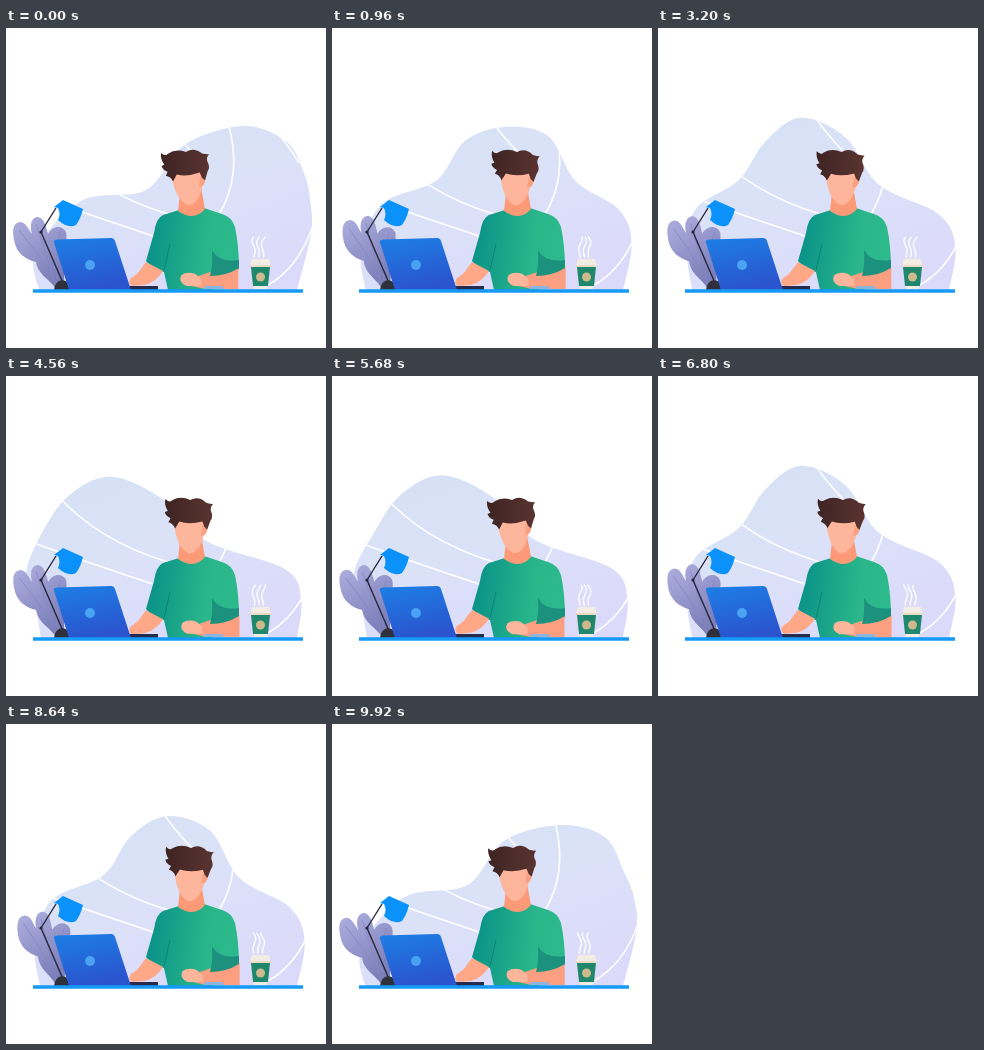
An HTML page that plays this animation: 320 by 320 pixels, repeating every 10 s.

```html
<!DOCTYPE html>
<html lang="en">
<head>
<meta charset="utf-8">
<title>Working at a desk</title>
<style>
  html, body { margin: 0; height: 100%; overflow: hidden; background: #fff; }
  svg { display: block; width: 100vw; height: 100vh; }
</style>
</head>
<body>
<svg viewBox="0 0 320 320">
  <defs>
    <linearGradient id="sky" x1="0" y1="0" x2=".6" y2="1">
      <stop stop-color="#d5e1f4"/><stop offset=".5" stop-color="#dbe2f8"/><stop offset="1" stop-color="#dcdafa"/>
    </linearGradient>
    <linearGradient id="leaf" x1="0" y1="0" x2=".5" y2="1">
      <stop stop-color="#b0b0e0"/><stop offset="1" stop-color="#7b7eb8"/>
    </linearGradient>
    <linearGradient id="shirt" x1="0" y1="0" x2="1" y2=".1">
      <stop offset=".1" stop-color="#0b9488"/><stop offset=".7" stop-color="#2ab68a"/><stop offset="1" stop-color="#2cb98b"/>
    </linearGradient>
    <linearGradient id="hair">
      <stop stop-color="#3e2423"/><stop offset="1" stop-color="#5a3430"/>
    </linearGradient>
    <linearGradient id="lid" x1="0" y1="0" x2=".3" y2="1">
      <stop stop-color="#1d7fe6"/><stop offset="1" stop-color="#2a55cf"/>
    </linearGradient>
    <clipPath id="inside"><path id="edge"/></clipPath>
    <clipPath id="above"><path d="M0 0H320V262H0Z"/></clipPath>
  </defs>

  <g clip-path="url(#above)">
    <path id="blob" fill="url(#sky)"/>
    <g clip-path="url(#inside)" fill="none" stroke="#fff" stroke-width="1.6">
      <path d="M50 118Q92 165 162 186M14 162Q80 186 150 209M152 82Q172 112 200 138"/>
      <path d="M221 92Q238 146 212 188M270 104Q282 116 293 135M306 200Q292 240 262 257"/>
    </g>
  </g>

  <g id="plant">
    <path fill="url(#leaf)" d="M50 261C44 251 32 247 30 234C20 232 10 225 8 212C6 202 7 195 14 194C20 194 22 201 26 206C23 196 26 189 32 189C38 190 40 198 42 206C46 198 56 196 60 204C62 215 57 225 58 236V261Z"/>
    <path fill="none" stroke="#8589c2" stroke-width=".8" d="M50 260Q40 224 30 196M43 243Q28 220 13 202M51 252Q49 220 54 204"/>
  </g>

  <path d="M57 255L35 204L50 180" fill="none" stroke="#25263a" stroke-width="1.4" stroke-linejoin="round"/>
  <circle cx="35" cy="204" r="1.6" fill="#25263a"/>
  <path d="M48 179L57 172L77 181Q75 190 70 197Q62 201 52 192Q55 186 52 180Z" fill="#0a92fa"/>
  <path d="M48 262Q49 253 56 252Q64 253 65 262Z" fill="#30303c"/>

  <g id="steam" fill="none" stroke="#fff" stroke-width="1.3" stroke-linecap="round"><path/><path/><path/></g>
  <path d="M246 231H263L265 238H264L261 261H248L245 238H244Z" fill="#f3ece2"/>
  <path d="M245 239H264L262 258H247Z" fill="#20876c"/>
  <path d="M244 238H265" stroke="#e3cbaa"/>
  <circle cx="254.500" cy="249" r="4.500" fill="#cdb98c"/>

  <path d="M173 182L157 187Q150 190 148 205L140 233Q148 243 158 244L162 262H206L233 241Q233 218 229 199Q226 189 216 186L198 180Z" fill="url(#shirt)"/>
  <path d="M158 242L164 216" fill="none" stroke="#0a8178" stroke-width=".9"/>
  <path d="M174 165L195 159L199 181Q188 194 172 183Z" fill="#fc9a78"/>
  <g id="head">
    <path d="M166 140L197 139Q200 158 193 170Q188 178 182 177Q171 173 167 150Z" fill="#fdb59b"/>
    <path d="M195 149Q201 147 200 154Q198 160 194 159Z" fill="#fba083"/>
    <path d="M157 124Q161 128 164 125Q172 120 182 124Q190 119 198 126Q202 127 205 127Q202 130 203 134Q206 140 203 144L200 153L197 150L195 145Q182 149 172 146L168 153Q166 148 161 147L163 143Q158 141 157 137L160 136Q156 130 157 124Z" fill="url(#hair)"/>
  </g>
  <path id="leftHand" d="M140 234L157 243Q150 254 139 257L126 258Q121 255 125 250Q132 246 134 242Z" fill="#fea888"/>
  <g id="rightHand">
    <path d="M190 249L205 244L233 239V261H200L186 258Z" fill="#fb9f80"/>
    <path d="M176 247Q182 243 190 246L196 251V258H181Q172 254 176 247Z" fill="#fdb59b"/>
  </g>
  <path d="M204 248Q207 238 206 222Q213 235 233 232V240Q220 248 204 248Z" fill="#1c917d"/>
  <path d="M199 258H216L218 261H197Z" fill="#8db4dc"/>

  <path d="M122 258H152V262H122Z" fill="#282b50"/>
  <path d="M51 211.500L105 210Q108 210 109 213L125 262H63L48 214.500Q47 212 51 211.500Z" fill="url(#lid)"/>
  <circle cx="84" cy="237" r="5" fill="#4aa3f2"/>
  <path d="M27 261.300H297V264.700H27Z" fill="#169af7"/>
</svg>

<script>
const LOOP = 10000, HALF = LOOP / 2, STEP = 80;
const el = id => document.getElementById(id);
const mix = (a, b, u) => a + (b - a) * u;
const smooth = u => u * u * (3 - 2 * u);

// Three poses of the backdrop: crest at the right, in the middle, at the left
const CREST = 3;
const poses = [
  [[75,173], [140,162], [178,117], [237,98], [281,114], [299,148], [304,172], [305,205]],
  [[42,177], [93,150], [119,112], [153,87], [196,106], [227,155], [282,185], [298,220]],
  [[18,200], [29,161], [57,121], [100,102], [152,124], [198,166], [279,194], [295,226]]
];

// The crest rushes to the middle, lingers, then glides left; the way back mirrors it
function outline(m) {
  const q = m / HALF * 2, toLeft = q > 1;
  const u = toLeft ? smooth(q - 1) : 1 - (1 - q) ** 3;
  const from = poses[+toLeft], to = poses[1 + toLeft];
  const pts = from.map((p, i) => p.map((v, n) => mix(v, to[i][n], u)));
  if (!toLeft) pts[CREST][1] += 14 * Math.sin(u * Math.PI);
  return smoothPath([[36, 270], [29, 225], ...pts, [289, 270]]);
}

function smoothPath(pts) {
  const at = i => pts[Math.min(Math.max(i, 0), pts.length - 1)];
  let d = "M" + pts[0];
  for (let i = 0; i < pts.length - 1; i++) {
    const [p, a, b, q] = [at(i - 1), at(i), at(i + 1), at(i + 2)];
    const c1 = a.map((v, n) => v + (b[n] - p[n]) / 6);
    const c2 = b.map((v, n) => v - (q[n] - a[n]) / 6);
    d += `C${c1} ${c2} ${b}`;
  }
  return d + "Z";
}

function wisp(x, t, phase) {
  const points = [];
  for (let y = 0; y <= 20; y += 2) {
    const bend = Math.sin(y * .3 + phase - t * Math.PI / 800) * (.6 + y * .09);
    points.push([x + bend, 229 - y]);
  }
  return "M" + points.join("L");
}

function draw(t) {
  const m = HALF - Math.abs(HALF - t);
  const shape = outline(m);
  el("blob").setAttribute("d", shape);
  el("edge").setAttribute("d", shape);

  const move = (id, transform) => el(id).setAttribute("transform", transform);
  const wave = period => t / period * 2 * Math.PI;
  const sway = Math.sin(Math.PI * (m / HALF) ** .65) ** 2;
  const nod = Math.cos(wave(1920)), tap = Math.sin(wave(640));
  move("plant", `rotate(${sway * 4.5} 50 261)`);
  move("head", `rotate(${.5 - nod * 2.6} 183 180)`);
  move("leftHand", `translate(0 ${tap * .5})`);
  move("rightHand", `translate(${-nod * .6} ${-tap * .3})`);

  [...el("steam").children].forEach((path, i) =>
    path.setAttribute("d", wisp(248 + i * 4.500, t, i * .6)));
}

const start = performance.now();
function frame() {
  const t = (performance.now() - start) % LOOP;
  draw(Math.floor(t / STEP) * STEP);
  requestAnimationFrame(frame);
}
frame();
</script>
</body>
</html>
```
